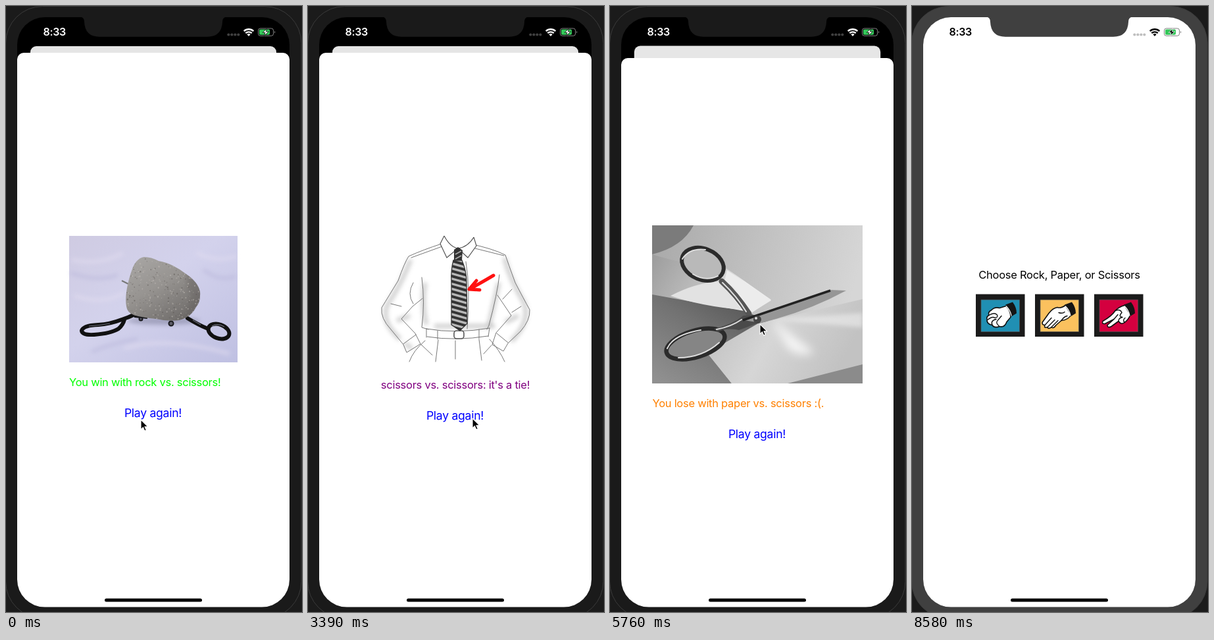
Write an HTML page that moves like this. It is 450 px wide and 920 px high and loops after 8680 ms.

```html
<!DOCTYPE html>
<html lang="en">
<head>
<meta charset="utf-8">
<title>Rock, Paper, Scissors</title>
<style>
  html, body { margin: 0; width: 100%; height: 100%; overflow: hidden; background: #1a1a1a; }
  svg { display: block; width: 450px; height: 920px; }
  text { font-family: Inter, "Open Sans", sans-serif; font-size: 16.5px; letter-spacing: -.27px; }
  .again { font-size: 17.6px; fill: #00f; text-anchor: middle; }
  .ink { fill: none; stroke: #111; stroke-width: 1.4; stroke-linecap: round; }
  .hand { fill: #fff; stroke: #111; stroke-width: 1.6; stroke-linejoin: round; }
  .pencil { fill: none; stroke: #777; stroke-width: 1; stroke-linecap: round; }
  .shade { fill: none; stroke: #888; stroke-width: 7; opacity: .38; filter: url(#soft); }
  .loop { fill: none; stroke: #111; stroke-width: 6; stroke-linecap: round; }
</style>
</head>
<body>
<svg viewBox="0 0 450 920">
  <defs>
    <clipPath id="screen"><rect x="17" y="17" width="414" height="895.6" rx="42"/></clipPath>
    <clipPath id="stone"><path id="rockShape" d="M183 456C180 440 186 416 191 402Q197 383 210 381Q221 381 232 387Q252 390 274 407Q292 419 295 434Q296 449 289 457Q281 473 263 477Q245 479 228 475Q207 473 194 469Q184 465 183 456Z"/></clipPath>
    <clipPath id="tieShape"><path id="tieEdge" d="M221 386L234 386Q241 402 241 420L242 482L231 493L218 484L218 420Q217 400 221 386Z"/></clipPath>
    <clipPath id="photo"><rect x="64" y="333" width="320" height="240"/></clipPath>
    <filter id="soft" x="-50%" y="-50%" width="200%" height="200%"><feGaussianBlur stdDeviation="3"/></filter>
    <filter id="haze" x="-50%" y="-50%" width="200%" height="200%"><feGaussianBlur stdDeviation="7"/></filter>
    <linearGradient id="cloth" x2="1" y2="1"><stop stop-color="#cfcbe2"/><stop offset=".45" stop-color="#d3d2ec"/><stop offset="1" stop-color="#bfc0e2"/></linearGradient>
    <linearGradient id="rockFill" x2=".7" y2="1"><stop stop-color="#aaa8a6"/><stop offset=".5" stop-color="#979491"/><stop offset="1" stop-color="#716e6c"/></linearGradient>
    <linearGradient id="wall" x2="1" y2=".2"><stop stop-color="#a8a8a8"/><stop offset=".5" stop-color="#c0c0c0"/><stop offset="1" stop-color="#d6d6d6"/></linearGradient>
    <linearGradient id="desk" x1=".9" x2=".1" y2="1"><stop stop-color="#505050"/><stop offset=".45" stop-color="#727272"/><stop offset="1" stop-color="#909090"/></linearGradient>
    <linearGradient id="sheetFill" x2="1" y2=".3"><stop stop-color="#bcbcbc"/><stop offset=".5" stop-color="#d6d6d6"/><stop offset="1" stop-color="#c2c2c2"/></linearGradient>
    <linearGradient id="curl" x2="1" y2=".3"><stop stop-color="#9c9c9c"/><stop offset=".5" stop-color="#bdbdbd"/><stop offset=".85" stop-color="#eee"/></linearGradient>
  </defs>

  <rect width="450" height="920" fill="#1b1b1b"/>
  <rect class="bezel" x="-.5" y=".5" width="449.5" height="929" rx="56" stroke="#3b3b3b"/>

  <g clip-path="url(#screen)">
    <rect width="450" height="920"/>
    <g id="rear">
      <rect id="page" x="17" y="17" width="414" height="896" fill="#fff"/>
      <text x="224" y="413.5" text-anchor="middle">Choose Rock, Paper, or Scissors</text>
      <g id="tiles"></g>
      <rect id="dim" x="17" y="17" width="414" height="896"/>
    </g>

    <g id="front">
      <rect id="sheet" x="17" y="71" width="414" height="860" rx="10"/>

      <g class="result">
        <rect x="96" y="349" width="256" height="192" fill="url(#cloth)"/>
        <g fill="none" stroke-width="5" filter="url(#soft)" opacity=".6">
          <path d="M100 385Q140 395 178 375M104 440Q150 455 180 435M290 375Q320 390 350 380M180 520Q240 500 340 528" stroke="#e3def0"/>
          <path d="M98 405Q140 420 170 408M300 400Q325 420 349 410M130 525Q160 512 200 505" stroke="#b9b7da"/>
        </g>
        <ellipse cx="240" cy="478" rx="55" ry="6" fill="#777894" opacity=".5" filter="url(#soft)"/>
        <path d="M176 417L188 423" stroke="#777" stroke-width="2"/>
        <path class="loop" d="M196 468Q186 473 176 476Q158 483 140 484Q117 485 115 493Q116 500 134 499Q160 497 171 490Q178 484 180 476"/>
        <path class="loop" d="M276 474Q292 484 307 490" stroke-width="5.5"/>
        <ellipse class="loop" cx="323.5" cy="494" rx="16.5" ry="10.5" transform="rotate(20 323.5 494)" stroke-width="5"/>
        <path d="M126 486Q142 485 158 482M313 486Q322 481 332 487M284 477L296 484" fill="none" stroke="#686a75" stroke-width="1.2"/>
        <path d="M195 471L215 473" stroke="#171719" stroke-width="4"/>
        <g fill="#5c5c66" stroke="#18181c" stroke-width="2"><circle cx="205" cy="475" r="2.5"/><circle cx="251" cy="482" r="3.5"/></g>
        <use href="#rockShape" fill="url(#rockFill)"/>
        <g clip-path="url(#stone)">
          <path d="M276 400Q272 425 282 440Q278 468 258 482L305 480V405Z" fill="#65615e" opacity=".4" filter="url(#soft)"/>
          <g id="specks"></g>
        </g>
        <text x="96" y="577" fill="#0f0">You win with rock vs. scissors!</text>
        <text class="again" x="223.5" y="624">Play again!</text>
      </g>

      <g class="result">
        <path class="shade" d="M156 385Q143 420 120 455Q111 480 140 506M299 382Q305 410 326 446Q342 475 309 509M178 420Q172 450 180 484M290 420L275 485"/>
        <path class="shade" d="M135 478L155 470M300 480L320 470M147 512L158 520M192 486L284 486" stroke-width="5"/>
        <path class="pencil" d="M203 361Q175 370 153 380Q147 389 137 417Q123 440 112 458Q110 474 126 491L145 514L150 526L171 513L163 497L142 475L159 456L174 444M246 361Q280 368 300 378Q304 390 315 420Q328 445 337 461Q338 477 323 494L304 512L297 524L280 514L286 496L309 470L288 439M173 412Q178 450 173 488L183 491M291 408Q288 437 275 485L272 491M157 382L204 365M246 366L298 379M145 513L164 499M287 497L304 511M160 420Q150 437 160 452M126 452L142 456M310 430L296 445M324 456L310 465"/>
        <path class="pencil" d="M180 490Q225 498 276 489M181 502Q224 509 274 501M180 490V503M276 489L274 502M197 493V506M260 491V505M198 507L194 540M224 508V536M260 506L264 538M178 508Q160 523 154 540M276 506Q291 522 299 540M172 514L189 530M279 515L267 528M240 388Q247 430 242 490"/>
        <path d="M207 349L201 361L211 382L228 368L243 382L256 364L252 351M207 349Q216 366 228 368Q243 366 252 351" fill="#fff" stroke="#555" stroke-width="1.2"/>
        <rect x="222" y="493" width="15" height="12" rx="4" fill="#fff" stroke="#555" stroke-width="1.6"/>
        <path d="M222 370L228 366L235 371L234 386H222Z" fill="#333"/>
        <path d="M224 377L233 372M224 384L233 379" stroke="#aaa" stroke-width="2"/>
        <g clip-path="url(#tieShape)">
          <rect x="215" y="384" width="30" height="112" fill="#b8b8b8"/>
          <path id="stripes" stroke="#333" stroke-width="4"/>
        </g>
        <use href="#tieEdge" fill="none" stroke="#333" stroke-width="1.3"/>
        <path d="M282 409Q265 419 249 428M256 417L245 430L261 431" fill="none" stroke="#f11" stroke-width="5" stroke-linecap="round" stroke-linejoin="round"/>
        <text x="224" y="581" fill="#800080" text-anchor="middle">scissors vs. scissors: it's a tie!</text>
        <text class="again" x="223.5" y="628">Play again!</text>
      </g>

      <g class="result" transform="translate(0 -8)">
        <g clip-path="url(#photo)">
          <rect x="64" y="333" width="320" height="240" fill="url(#wall)"/>
          <path d="M64 333H127Q110 366 64 377Z" fill="#7b7b7b"/>
          <path d="M64 377Q110 392 178 399L245 446L215 466L64 440Z" fill="url(#curl)"/>
          <path d="M64 438Q130 450 204 463L240 478L148 527L185 573H64Z" fill="url(#desk)"/>
          <path d="M92 440Q130 420 168 418L200 461Q140 456 92 440Z" fill="#e2e2e2"/>
          <path d="M148 527L225 482L384 445V545L270 573H185Z" fill="url(#sheetFill)"/>
          <path d="M270 573L384 544V573Z" fill="#8b8b8b"/>
          <path d="M246 476L310 525Q290 535 270 520Z" fill="#f4f4f4" filter="url(#haze)"/>
          <path d="M245 476L384 466V488Z" fill="#eee" opacity=".6" filter="url(#soft)"/>
          <path d="M178 401L245 447L214 466Q201 432 174 418Z" fill="#ececec"/>
          <g fill="none" stroke="#2b2b2b" stroke-linecap="round">
            <ellipse cx="141" cy="392" rx="33" ry="23.5" transform="rotate(22 141 392)" fill="#b9b9b9" stroke-width="6"/>
            <path d="M170 418Q192 438 211 467" stroke="#555" stroke-width="9"/>
            <ellipse cx="130" cy="513" rx="46" ry="20" transform="rotate(-17 130 513)" fill="#858585" stroke-width="6.5"/>
          </g>
          <path d="M158 490Q185 484 203 470L226 469L234 478L196 492Q178 488 164 495Z" fill="#4a4a4a"/>
          <path d="M203 477L335 431L359 432Q300 464 230 481Z" fill="#969696"/>
          <path d="M202 477L335 432" stroke="#222" stroke-width="3.5"/>
          <g fill="none" stroke="#dedede" stroke-width="2" stroke-linecap="round">
            <path d="M171 420Q193 441 207 464M110 384Q121 367 145 370M126 407Q145 419 164 410"/>
            <path d="M87 520Q96 499 138 492M104 534Q140 534 166 511M162 491Q184 487 200 476"/>
          </g>
          <circle cx="224" cy="476" r="6" fill="#444"/><circle cx="222" cy="474" r="2" fill="#ddd"/>
        </g>
        <text x="64.5" y="609" fill="#ff8000">You lose with paper vs. scissors :(.</text>
        <text class="again" x="223.5" y="656">Play again!</text>
      </g>
    </g>

    <g id="status">
      <text x="56.5" y="45.3" style="font-size:16px;font-weight:600;letter-spacing:-.3px">8:33</text>
      <g opacity=".25"><circle cx="338.3" cy="43.5" r="2.1"/><circle cx="343.3" cy="43.5" r="2.1"/><circle cx="348.3" cy="43.5" r="2.1"/><circle cx="353.3" cy="43.5" r="2.1"/></g>
      <path d="M361.7 38.2A10.7 10.7 0 0 1 376.3 38.2M364.3 41.2A6.9 6.9 0 0 1 373.7 41.2" fill="none" stroke="currentColor" stroke-width="2.4"/>
      <path d="M366.4 43.1A4 4 0 0 1 371.6 43.1L369 45.9Z"/>
      <rect x="383.5" y="34" width="23" height="11.3" rx="3.2" fill="none" stroke="currentColor" opacity=".5"/>
      <path d="M408 38Q410.5 39.7 408 41.5Z" opacity=".5"/>
      <rect x="385" y="35.5" width="16" height="8.3" rx="1.8" fill="#34c759"/>
      <path id="bolt" d="M396.5 34.2L390.2 40.4H394L392.7 45.2L399.4 38.8H395.4Z" stroke-width=".8"/>
    </g>
    <rect x="150" y="899.5" width="148" height="5" rx="2.5"/>
  </g>

  <path class="bezel" d="M112 16Q119 17 119 24Q120 46.7 142 46.7H306Q328 46.7 329 24Q329 17 336 16Z"/>
  <path id="cursor" d="M0 0V14.8L3.4 11.7L5.8 17L8.3 16L6 10.7H10.6Z" stroke="#fff" stroke-width="1.1"/>
</svg>

<script>
const LOOP = 8680, FIRST = 420, TICK = 148.35, RATE = 2.97, TRAVEL = 841;
const $ = id => document.getElementById(id);
const set = (el, attrs) => { for (const k in attrs) el.setAttribute(k, attrs[k]); };

const hands = [
  ['#208fb3', 'M20 32Q18 27 24 24Q29 19 36 21L46 18Q53 25 53 35L47 42Q44 51 36 49Q28 52 25 47Q16 45 17 38Q16 34 20 32Z',
    'M20 32Q28 27 32 31Q35 35 29 36M18 39Q25 33 29 36M25 47Q22 40 31 38M35 48Q29 43 34 39L39 33'],
  ['#fbc15e', 'M46 17Q39 22 34 20Q27 21 21 29L11 43Q11 47 15 47Q13 52 19 50Q20 54 25 50Q28 53 32 47L40 40Q51 39 55 31Z',
    'M15 47L25 36M19 50L30 39M25 50L35 40M36 28Q42 30 45 27M40 40Q44 34 49 33'],
  ['#d4003f', 'M46 17Q38 19 32 25Q27 33 13 41Q11 45 16 45L30 38L20 47Q20 52 26 49L37 41Q41 47 46 43Q52 39 55 31Z',
    'M30 38L36 31M32 25Q40 22 42 28Q36 34 43 35M37 41Q37 36 43 35M46 43Q43 39 47 36'],
];
$('tiles').innerHTML = hands.map(([color, shape, folds], i) => `
  <g transform="translate(${97 + 90 * i} 437.5)">
    <rect width="74.5" height="64.5" fill="#1b1b1b"/>
    <rect x="8" y="8.5" width="58.5" height="48.5" fill="${color}" stroke="#555" stroke-width=".7"/>
    <path class="hand" d="${shape}"/><path class="ink" d="${folds}"/>
    <path d="M45 16L56 12Q62 20 62 29L54 34Q53 24 45 16Z" fill="#151515"/>
    <path d="M46 18Q53 25 54 33" fill="none" stroke="#fff" stroke-width="1.3"/>
    <rect class="press" width="74.5" height="64.5" opacity="0"/>
  </g>`).join('');

let seed = 7;
const rand = () => (seed = seed * 16807 % 2147483647) / 2147483647;
const tones = ['#5f5b58', '#77726e', '#b3aea8', '#bfbab4'];
$('specks').innerHTML = Array.from({ length: 420 }, () =>
  `<circle cx="${180 + rand() * 118}" cy="${380 + rand() * 98}" r="${.4 + rand() * .8}" fill="${tones[rand() * 4 | 0]}" opacity=".6"/>`).join('');
set($('stripes'), { d: Array.from({ length: 16 }, (_, i) => `M214 ${378 + i * 7.7}l32 9`).join('') });

// first tick, spring phase at that tick, opening or closing
const moves = [[0, 1.2, 0], [12, 1.1, 1], [25, 1.5, 0], [34, .76, 1], [48, 1.57, 0]];
const trail = [
  [2, 205, 628], [7, 223, 483], [10, 312, 482], [14, 312, 482], [19, 253, 623], [20, 250, 626],
  [26, 250, 626], [30, 224, 483], [32, 224, 483], [33, 228, 483], [37, 228, 483], [39, 226, 603], [42, 219, 646],
];
const presses = [[2, 10, 12], [1, 32, 34]];

const spring = x => (1 + x) * Math.exp(-x);
const mix = (a, b, k) => a + (b - a) * k;

function sheetAt(n) {
  const move = moves.filter(m => m[0] <= n).pop();
  if (!move) return { p: 1, closing: false };
  const left = spring(move[1] + RATE * (n - move[0]));
  const p = move[2] ? 1 - left : left;
  return { p: p < .002 ? 0 : p > .9999 ? 1 : p, closing: !move[2] };
}

function cursorAt(n) {
  const i = trail.findIndex(k => k[0] > n);
  if (i === 0) return trail[0].slice(1);
  if (i < 0) return trail[trail.length - 1].slice(1);
  const [a, x, y] = trail[i - 1], [b, u, v] = trail[i], k = (n - a) / (b - a);
  return [mix(x, u, k), mix(y, v, k)];
}

const results = document.querySelectorAll('.result');
const covers = document.querySelectorAll('.press');
const bezels = document.querySelectorAll('.bezel');

function draw(n) {
  const { p, closing } = sheetAt(n);
  const scene = n < 12 ? 0 : n < 34 ? 1 : 2;
  const rx = mix(30, 10, p);
  set($('rear'), { transform: `translate(224 ${mix(17, 61, p)}) scale(${1 - p * 40 / 414}) translate(-224 -17)` });
  set($('page'), { rx });
  set($('dim'), { rx, opacity: .1 * p * p });
  set($('front'), { transform: `translate(0 ${TRAVEL * (1 - p)})`, visibility: p ? 'visible' : 'hidden' });
  set($('sheet'), { fill: closing ? '#f7f7f7' : '#fff' });
  results.forEach((el, i) => { el.style.display = i === scene ? '' : 'none'; });
  covers.forEach((el, i) => set(el, { opacity: presses.some(([t, a, b]) => t === i && n >= a && n < b) ? .47 : 0 }));

  const ink = p > .5 ? '#fff' : '#000';
  set($('status'), { fill: ink, color: ink });
  set($('bolt'), { stroke: p > .5 ? '#000' : '#fff' });

  const idle = n >= 55;
  bezels.forEach(el => set(el, { fill: idle ? '#404040' : '#1a1a1a' }));
  const [x, y] = cursorAt(n);
  set($('cursor'), { transform: `translate(${x} ${y})`, visibility: idle ? 'hidden' : 'visible' });
}

const start = performance.now();
let shown;
function frame() {
  const t = (performance.now() - start) % LOOP;
  const n = Math.floor((t - FIRST) / TICK + .04);
  if (n !== shown) draw(shown = n);
  requestAnimationFrame(frame);
}
frame();
</script>
</body>
</html>
```
